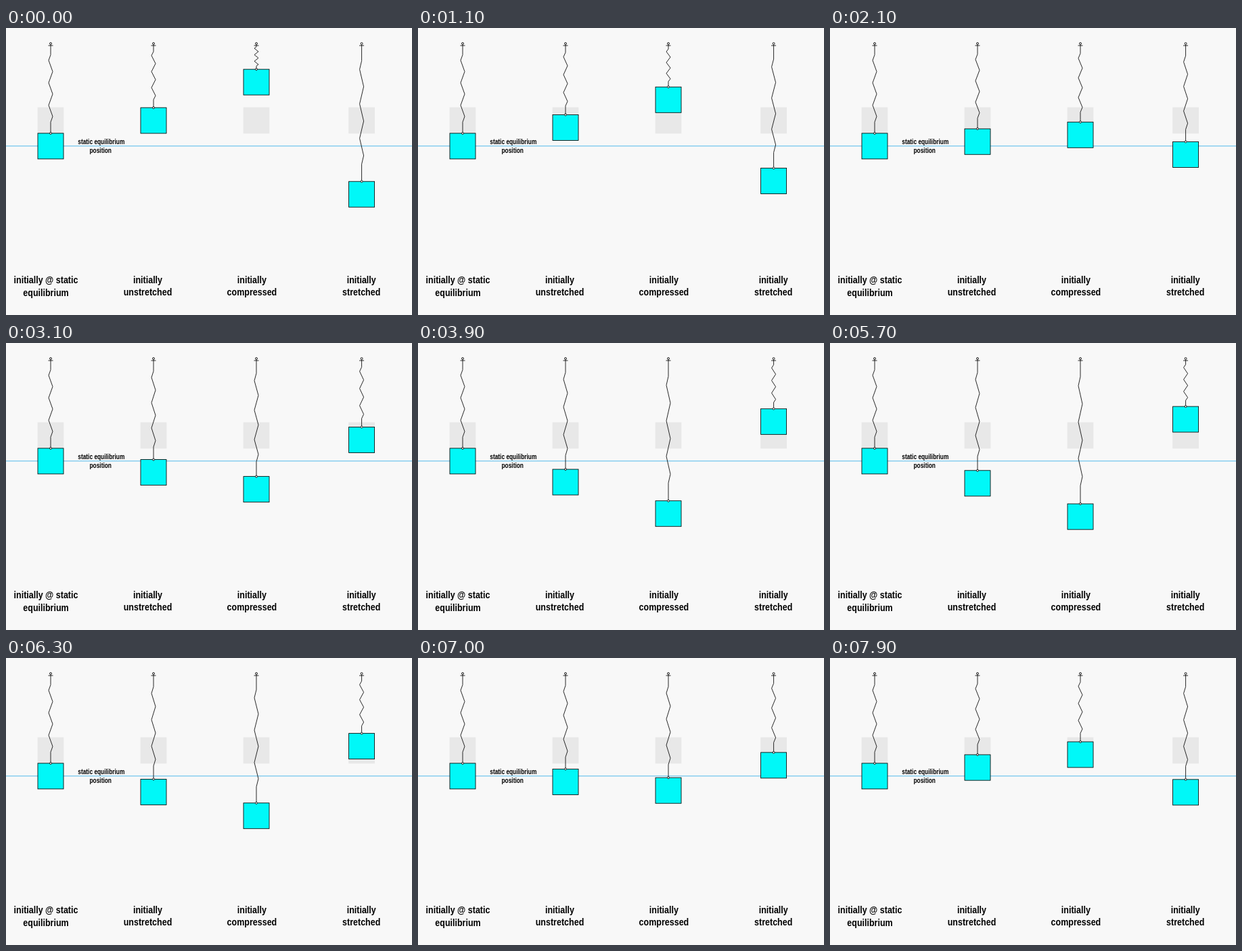
Animation of 600x425 px, one loop 8 s. Source, as an HTML page:

```html
<!DOCTYPE html>
<html lang="en">
<head>
<meta charset="utf-8">
<title>Spring oscillation from four starting positions</title>
<style>
  html, body { margin: 0; width: 100%; height: 100%; overflow: hidden; background: #f8f8f8; }
  svg { display: block; width: 600px; height: 425px; }
  text { font: bold 15px "Liberation Sans", Arial, sans-serif; text-anchor: middle; fill: #000; }
  .small { font-size: 10px; }
  .ghost { fill: #e8e8e8; }
  .level { stroke: #52b9ea; }
  .box { fill: #00f8f8; stroke: #000; stroke-width: .85; }
  .wire { fill: none; stroke: #111; stroke-width: .9; }
  .pin { fill: #f8f8f8; stroke: #111; stroke-width: .9; }
</style>
</head>
<body>
<svg id="stage" viewBox="0 0 600 425"></svg>
<script>
const LOOP = 8000, STEP = 100;
const TOP = 23, REST = 155.9, SIZE = 38;
const START_PHASE = 4, PHASE_STEP = 3.615; // degrees
const NARROW = 0.835;

const columns = [
  { x: 66, amp: 0, labelX: 59, labelY: 378, label: ['initially @ static', 'equilibrium'] },
  { x: 218, amp: -38, labelX: 209.5, labelY: 377.5, label: ['initially', 'unstretched'] },
  { x: 370, amp: -95, labelX: 363.4, labelY: 377.5, label: ['initially', 'compressed'] },
  { x: 525.6, amp: 71.5, labelX: 525.2, labelY: 377.5, label: ['initially', 'stretched'] }
];

const stage = document.getElementById('stage');

function add(tag, attrs, content = '') {
  const el = document.createElementNS('http://www.w3.org/2000/svg', tag);
  for (const key in attrs) el.setAttribute(key, attrs[key]);
  el.textContent = content;
  return stage.appendChild(el);
}

function addText(content, x, y, cls = '') {
  add('text', { class: cls, transform: `translate(${x} ${y}) scale(${NARROW} 1)` }, content);
}

// Straight ends of 1/8 length with six zigzag points between them.
function springPath(x, end) {
  const at = (dx, part) => `${x + dx} ${TOP + (end - TOP) * part / 16}`;
  const points = [`${x} ${TOP + 1.5}`, at(0, 2)];
  for (let i = 0; i < 6; i++) points.push(at(i % 2 ? 3 : -3, 3 + 2 * i));
  points.push(at(0, 14), at(0, 16));
  return 'M' + points.join('L');
}

for (const { x } of columns)
  add('rect', { class: 'ghost', x: x - 19.4, y: REST - SIZE - 0.4, width: SIZE + 0.8, height: SIZE + 0.8 });
add('path', { class: 'level', d: 'M0 174.8H600' });
addText('static equilibrium', 140.8, 171.5, 'small');
addText('position', 139.7, 184.5, 'small');

for (const col of columns) {
  const { x } = col;
  col.box = add('rect', { class: 'box', x: x - SIZE / 2, width: SIZE, height: SIZE });
  col.wire = add('path', { class: 'wire' });
  col.pin = add('circle', { class: 'pin', cx: x, r: 1.5 });
  add('circle', { class: 'pin', cx: x, cy: TOP, r: 1.5 });
  add('path', { class: 'wire', d: `M${x - 3.5} 26H${x + 3.5}` });
  col.label.forEach((line, i) => addText(line, col.labelX, col.labelY + 18.6 * i));
}

function draw(time) {
  const step = Math.floor(time % LOOP / STEP);
  const swing = Math.cos((START_PHASE + PHASE_STEP * step) * Math.PI / 180);
  for (const { x, amp, box, wire, pin } of columns) {
    const y = REST + amp * swing;
    box.setAttribute('y', y);
    wire.setAttribute('d', springPath(x, y));
    pin.setAttribute('cy', y);
  }
}

let begin;
function tick(now) {
  begin ??= now;
  draw(now - begin);
  requestAnimationFrame(tick);
}
draw(0);
requestAnimationFrame(tick);
</script>
</body>
</html>
```
